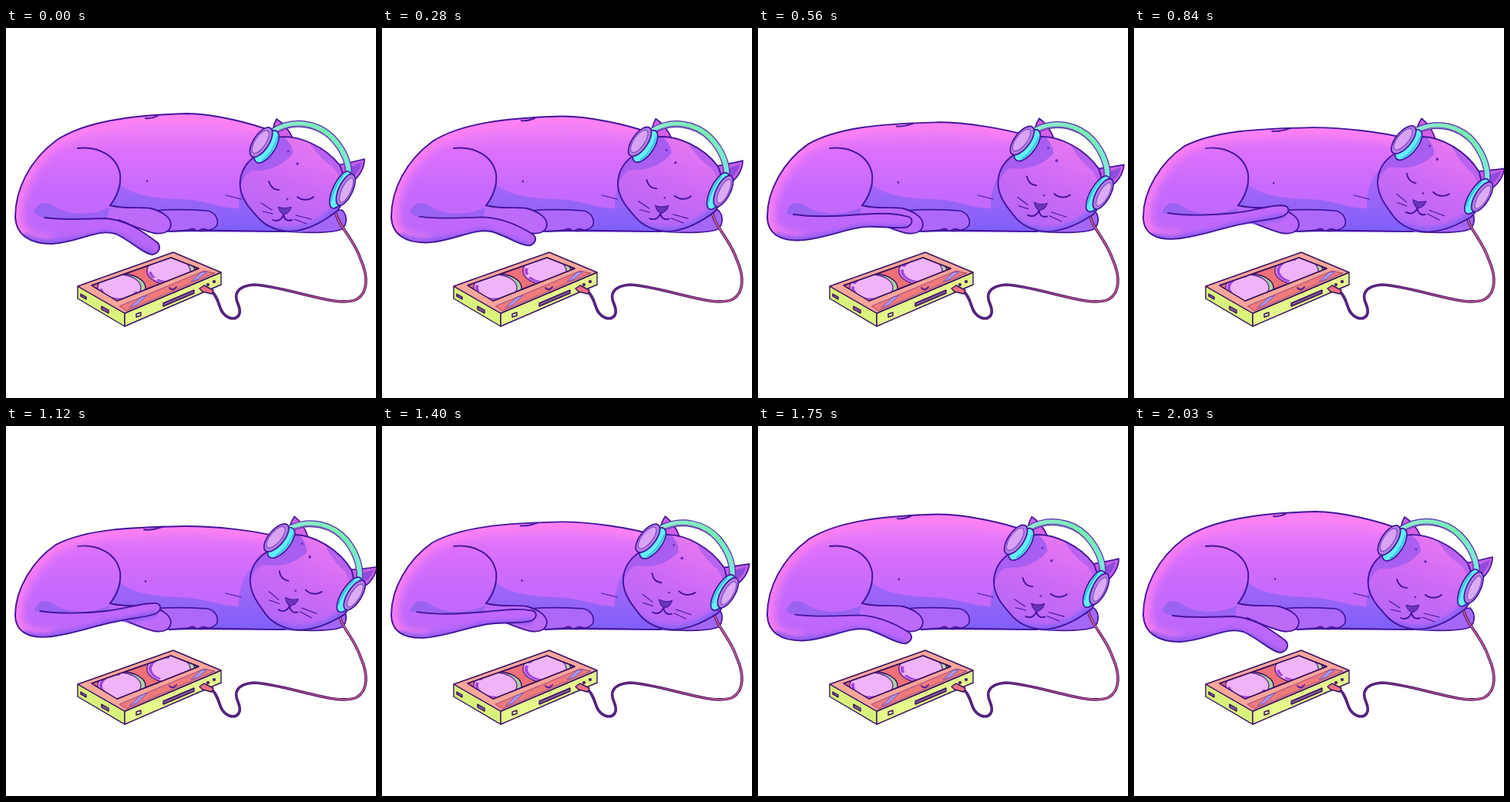
An HTML page for the animation above (2100 ms loop, 480 by 480 pixels).

```html
<!DOCTYPE html>
<html lang="en">
<head>
<meta charset="utf-8">
<title>Sleeping cat with headphones</title>
<style>
html, body { margin: 0; width: 100%; height: 100%; overflow: hidden; background: #fff; }
svg { display: block; width: 100vw; height: 100vh; }
.line { fill: none; stroke: #42159c; stroke-width: 1.9; stroke-linecap: round; stroke-linejoin: round; }
.ink { stroke: #42159c; stroke-width: 1.7; stroke-linejoin: round; }
.thin { stroke-width: 1.1; }
.box { stroke: #35105f; stroke-width: 1.4; stroke-linejoin: round; }
</style>
</head>
<body>
<svg viewBox="0 0 480 480">
  <defs>
    <linearGradient id="fur" gradientUnits="userSpaceOnUse" x1="0" y1="112" x2="0" y2="285">
      <stop offset="0" stop-color="#fb88f6"/>
      <stop offset=".28" stop-color="#dc70fa"/>
      <stop offset=".55" stop-color="#c86afd"/>
      <stop offset="1" stop-color="#b866f8"/>
    </linearGradient>
    <linearGradient id="belly" gradientUnits="userSpaceOnUse" x1="0" y1="200" x2="0" y2="265">
      <stop offset="0" stop-color="#a866f8"/>
      <stop offset="1" stop-color="#7e60f8"/>
    </linearGradient>
    <linearGradient id="face" gradientUnits="userSpaceOnUse" x1="395" y1="140" x2="355" y2="264">
      <stop offset="0" stop-color="#ea78f0"/>
      <stop offset=".5" stop-color="#cd6af5"/>
      <stop offset="1" stop-color="#b566f6"/>
    </linearGradient>
    <linearGradient id="band" gradientUnits="userSpaceOnUse" x1="350" y1="125" x2="446" y2="190">
      <stop offset="0" stop-color="#8fe9d0"/>
      <stop offset=".5" stop-color="#74efae"/>
      <stop offset="1" stop-color="#7de8dc"/>
    </linearGradient>
    <linearGradient id="wire" gradientUnits="userSpaceOnUse" x1="455" y1="250" x2="300" y2="375">
      <stop offset="0" stop-color="#d8648c"/>
      <stop offset=".5" stop-color="#c04f80"/>
      <stop offset=".85" stop-color="#5c2788"/>
    </linearGradient>
    <filter id="soft" filterUnits="userSpaceOnUse" x="-20" y="80" width="520" height="240">
      <feGaussianBlur stdDeviation="6"/>
    </filter>
    <filter id="haze" filterUnits="userSpaceOnUse" x="-20" y="80" width="520" height="240">
      <feGaussianBlur stdDeviation="2.5"/>
    </filter>
    <path id="torso"
      data-a="M420 180 L345 134 C320 124 270 111 235 111 C160 113 100 122 65 146 C30 172 12 210 12 245 L50 262 L142 252 L213 264 L385 265 Z"
      data-b="M420 190 L354 144 C322 136 270 130 230 130.5 C160 132 105 134 65 154 C34 175 12 212 12 245 L50 262 L142 252 L213 264 L385 265 Z"/>
    <path id="tail" class="tail"
      data-a="M50 246 C80 250 110 247 130 247 C155 249 175 262 196 278 C202 284 199 292 190 294 C178 293 162 276 142 267 C118 260 95 278 60 280 C30 280 13 268 12 245"
      data-b="M44 240 C70 244 105 243 130 240 C155 237 175 230 190 230 C201 229 204 237 195 243 C185 248 162 249 142 254 C118 258 95 268 60 273 C28 277 12 266 12 245"/>
    <path id="skull" d="M321 168 C308 178 302 193 304 208 C307 226 319 237 330 249 C341 260 360 266 378 263 C398 259 413 250 430 237 C442 222 442 199 433 178 C415 155 380 137 350 142 Z"/>
    <path id="window" d="M111 334 L214 298 L250 312 L144 354 Z"/>
    <clipPath id="inCat"><use href="#torso"/><use href="#tail"/></clipPath>
    <clipPath id="inTorso"><use href="#torso"/></clipPath>
    <clipPath id="inHead"><use href="#skull"/></clipPath>
    <clipPath id="inWindow"><use href="#window"/></clipPath>
    <g id="reel">
      <ellipse cx="3" rx="31" ry="18" fill="#a9d7a0" class="box"/>
      <ellipse rx="28" ry="17" fill="#efb4f8" stroke="#6b249f" stroke-width="1.4"/>
      <g transform="scale(1 .61)">
        <circle class="spin" r="24" fill="none" stroke="#a544de" stroke-width="4" pathLength="100" stroke-dasharray="30 4 9 57"/>
      </g>
    </g>
  </defs>

  <!-- forepaw under the chin -->
  <path class="ink" fill="#a467f6" d="M360 264 C385 259 412 238 436 236 C443 243 443 254 436 261 C420 267 390 266 360 264 Z"/>

  <use href="#torso" fill="url(#fur)"/>
  <g clip-path="url(#inTorso)">
    <path fill="url(#belly)" d="M147 201 C158 215 187 221 225 222 C255 222 276 234 302 234 C302 215 305 200 316 186 L400 186 L400 268 L205 268 L136 231 Z"/>
    <path fill="#9a63f2" d="M37 240 C39 227 52 223 63 232 C82 244 113 244 138 231 L166 246 L130 252 L50 248 Z"/>
  </g>
  <path class="line" d="M93 156 C119 153 143 165 148 189 C150 207 143 220 135 230"/>
  <path class="line" d="M212 264 C270 261 320 264 362 264"/>

  <path class="ink" fill="#ad68f9" d="M194 237 C220 234 246 236 262 237 C272 240 277 249 273 257 C267 264 251 264 238 262 L208 264 Z"/>
  <path class="line" d="M237 262 q5 -3 9 0 M250 263 q5 -4 11 -1"/>
  <path fill="#bd6af9" d="M135 230 C150 235 175 232 188 234 C203 238 214 246 214 255 C213 265 203 268 192 266 C175 262 160 254 130 249 Z"/>
  <path class="line" d="M135 230 C150 235 175 232 188 234 C203 238 214 246 214 255 C213 265 203 268 192 266 C175 262 160 254 146 249"/>

  <use href="#tail" fill="url(#fur)"/>
  <g clip-path="url(#inCat)">
    <path fill="none" stroke="#ff80f2" stroke-width="17" filter="url(#soft)"
      data-a="M345 134 C320 124 270 111 235 111 C160 113 100 122 65 146 C30 172 12 210 12 245 C13 268 30 280 60 280"
      data-b="M354 144 C322 136 270 130 230 130.5 C160 132 105 134 65 154 C34 175 12 212 12 245 C12 266 28 277 60 273"/>
    <path class="tail" fill="none" stroke="#8c5cf2" stroke-width="7" filter="url(#haze)"
      data-a="M22 268 C50 285 95 276 125 266 C150 265 172 291 190 294"
      data-b="M22 268 C50 278 95 268 125 257 C150 252 172 249 195 243"/>
  </g>
  <path class="line"
    data-a="M345 134 C320 124 270 111 235 111 C160 113 100 122 65 146 C30 172 12 210 12 245"
    data-b="M354 144 C322 136 270 130 230 130.5 C160 132 105 134 65 154 C34 175 12 212 12 245"/>
  <use href="#tail" class="line"/>
  <path class="line" data-a="M181 117 Q188 118 197 114" data-b="M179 135 Q190 136 204 131"/>
  <path class="line thin" d="M285 217 L305 222"/>
  <path class="line" stroke-width="3" data-a="M183 198 L183 199" data-b="M181 201 L181 202"/>

  <!-- cord -->
  <g fill="none" stroke-linecap="round">
    <path class="cord" stroke="#44146f" stroke-width="3.6"/>
    <path class="cord" stroke="url(#wire)" stroke-width="1.7"/>
  </g>

  <!-- head and headphones -->
  <g id="head">
    <path class="ink" fill="#d45fe6" d="M346 146 C345 134 347 125 351 118 C359 123 367 132 372 143 Z"/>
    <path class="ink" fill="#c65fe8" d="M418 180 C432 178 449 174 465 170 C465 182 458 194 447 201 L426 193 Z"/>
    <path fill="#8f4bdd" d="M442 183 L461 174 C460 183 455 189 449 194 Z"/>
    <use href="#skull" fill="url(#face)"/>
    <g clip-path="url(#inHead)">
      <path fill="#a85ef0" d="M300 160 L352 136 C366 143 373 155 372 163 C360 177 344 186 320 185 C312 187 307 196 304 208 Z"/>
      <path fill="#b962f0" d="M391 145 C402 162 411 172 425 181 L440 205 L440 165 Z"/>
      <path fill="#8c64f8" filter="url(#haze)" d="M330 250 C350 259 372 261 390 254 C412 246 424 234 438 214 L440 268 L330 268 Z"/>
    </g>
    <use href="#skull" class="line"/>
    <g id="features">
      <path class="line" d="M341 199 C343 206 348 210 354 210 M378 219 C384 224 393 224 399 219"/>
      <path fill="#6a35b9" stroke="#42159c" d="M353 232 C358 234 365 234 370 232 C369 238 364 242 360 242 C356 240 354 236 353 232 Z"/>
      <path class="line" d="M360 242 C358 248 353 252 346 249 M360 242 C361 249 366 251 371 249"/>
      <path class="line thin" d="M331 227 L345 236 M333 238 L346 241 M376 243 L396 248 M374 248 L390 254"/>
      <g fill="#6a25b4"><circle cx="365" cy="222" r="1.4"/><circle cx="378" cy="176" r="1.8"/><circle cx="366" cy="160" r="1.4"/></g>
    </g>
    <g fill="none">
      <path id="arch" stroke="#5a2bab" stroke-width="9" d="M347 134 C372 118 403 123 422 141 C437 156 446 175 444 192"/>
      <path stroke="url(#band)" stroke-width="6.5" d="M347 134 C372 118 403 123 422 141 C437 156 446 175 444 192"/>
      <path stroke="#7551b5" stroke-width="1" d="M350 135 C374 121 401 126 419 143 C433 158 442 176 441 191"/>
    </g>
    <g transform="translate(338 154) rotate(33)">
      <ellipse class="ink" rx="11" ry="24" fill="#62f0f6"/>
      <path fill="none" stroke="#3fbfe2" stroke-width="2" d="M5 -19 C9 -6 9 8 5 19"/>
      <ellipse class="ink" cx="-9" cy="-1" rx="10" ry="22" fill="#b57de8"/>
      <ellipse cx="-10" cy="-1" rx="7" ry="17" fill="#d9a2f5" stroke="#7640bb"/>
    </g>
    <g transform="translate(434 210) rotate(25)">
      <ellipse class="ink" rx="10" ry="26" fill="#62f0f6"/>
      <path fill="none" stroke="#3fbfe2" stroke-width="2" d="M-5 -19 C-8 -6 -8 8 -5 19"/>
      <ellipse class="ink" cx="6" cy="-3" rx="9" ry="22" fill="#b57de8"/>
      <ellipse cx="7" cy="-3" rx="6" ry="17" fill="#dcabf6" stroke="#7640bb"/>
    </g>
  </g>

  <!-- cassette player -->
  <g>
    <path class="box" fill="#d9f27c" d="M93 335 L154 370 V387 L93 351 Z"/>
    <path class="box" fill="#e5f68b" d="M154 370 L279 317 V333 L154 387 Z"/>
    <path class="box" fill="#f8a59a" d="M93 335 L217 291 L279 317 L154 370 Z"/>
    <path fill="#ee7a7c" stroke="#8a3a78" stroke-width=".8" d="M147 361 L257 315 L271 318 L156 367 Z"/>
    <path fill="#a99af0" stroke="#6d46b3" stroke-width=".8" d="M160 363 L174 350 L184 346 L170 359 Z M240 329 L253 317 L261 316 L249 326 Z"/>
    <use href="#window" class="box" fill="#ee7078"/>
    <g clip-path="url(#inWindow)">
      <use href="#reel" transform="translate(147 337)"/>
      <use href="#reel" transform="translate(211 315)"/>
    </g>
    <use href="#window" class="box" fill="none"/>
    <path class="line" d="M212 337 q4 5 9 -1"/>
    <g class="box" fill="#8b5a9a">
      <path d="M97 345 l7 4 v3 l-7 -4 Z M124 361 l9 5 v4 l-9 -5 Z"/>
      <path d="M204 357 L244 340 V344 L204 361 Z"/>
      <path fill="#f3f7b0" d="M169 371 l6 -2 v4 l-6 2 Z"/>
      <circle cx="262" cy="333" r="1.4"/><circle cx="270" cy="329" r="1.4"/>
    </g>
    <path class="box" fill="#ec7181" d="M251 338 L257 334 L269 340 L267 345 L255 342 Z"/>
  </g>
</svg>
<script>
const STEP = 70, COUNT = 30, TAIL_LEAD = 1.15;
const $ = id => document.getElementById(id);
const all = q => [...document.querySelectorAll(q)];
const number = /-?\d+(?:\.\d+)?/g;

// Blend two paths that share the same commands.
function mix(a, b, k) {
  const ends = b.match(number);
  let i = 0;
  return a.replace(number, n => (+n + (ends[i++] - n) * k).toFixed(2));
}

// Ease from 0 to 1 as x goes from 0 to 1.
const ease = x => (1 - Math.cos(Math.PI * Math.min(x, 1))) / 2;

const morphs = all('[data-a]');
const cords = all('.cord');
const spins = all('.spin');
const cordEnd = ' C470 322 470 343 455 352 C430 364 365 335 321 333 C300 335 295 345 301 358 C307 372 300 379 290 376 C274 370 279 352 267 342';

function pose(step) {
  // The second half plays the first half backwards.
  const x = 2 * Math.min(step, COUNT - 1 - step) / (COUNT - 1);
  const k = ease(x), swing = ease(x * TAIL_LEAD);
  for (const p of morphs) {
    p.setAttribute('d', mix(p.dataset.a, p.dataset.b, p.classList.contains('tail') ? swing : k));
  }
  const cord = mix('M427 236 C429 255 452 274 460 300', 'M433 244 C433 259 452 275 460 300', k) + cordEnd;
  for (const c of cords) c.setAttribute('d', cord);
  $('head').setAttribute('transform', `rotate(${7.2 * k} 368 308)`);
  $('features').setAttribute('transform', `translate(${-k} ${-8.5 * k})`);
  for (const s of spins) s.setAttribute('transform', `rotate(${20 + 100 * k})`);
}

let last = -1;
function draw(now) {
  const step = Math.floor(now / STEP) % COUNT;
  if (step !== last) pose(last = step);
  requestAnimationFrame(draw);
}
pose(0);
requestAnimationFrame(draw);
</script>
</body>
</html>
```
